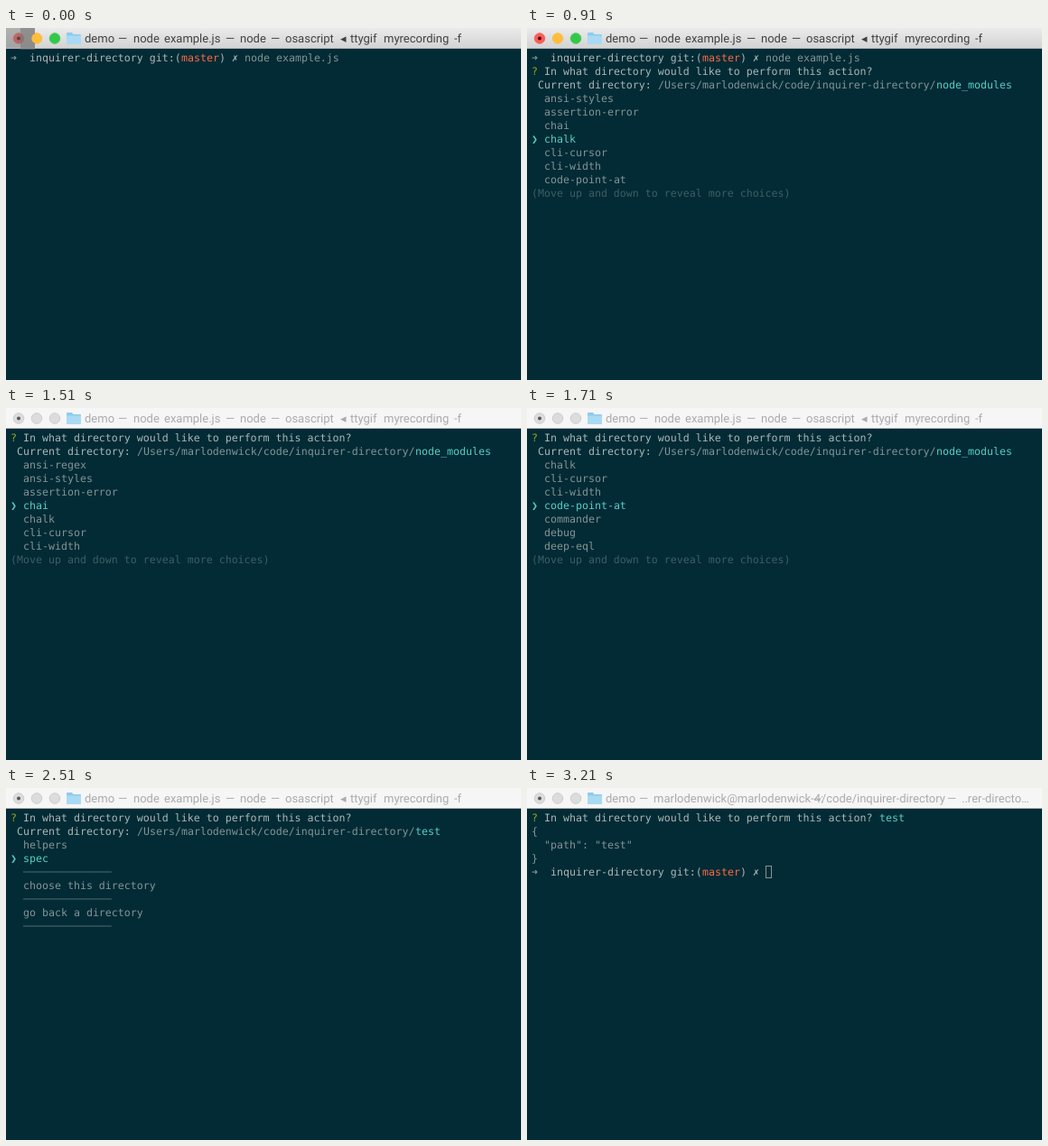
Animation, 570 px wide and 390 px high, one loop 3.36 s. Source, as an HTML page:

```html
<!DOCTYPE html>
<html lang="en">
<head>
<meta charset="utf-8">
<title>Directory prompt</title>
<style>
html, body { margin: 0; width: 100%; height: 100%; overflow: hidden; background: #022b35; }
svg { display: block; width: 570px; height: 390px; }
text { white-space: pre; text-rendering: geometricPrecision; }
#screen text { font: 11.627px "DejaVu Sans Mono", monospace; }
#title text { font: 13px Roboto, "DejaVu Sans", sans-serif; }
</style>
</head>
<body>
<svg viewBox="0 0 570 390">
  <defs>
    <linearGradient id="bar" x2="0" y2="1">
      <stop stop-color="#ebebeb"/><stop offset="1" stop-color="#d3d3d3"/>
    </linearGradient>
  </defs>
  <rect width="570" height="390" fill="#022b35"/>
  <rect id="titleBar" width="570" height="22"/>
  <rect y="22" width="570" height="1" fill="#b4b8b9"/>
  <g id="lights" stroke-width=".8"></g>
  <circle cx="14" cy="11.5" r="2" id="dot"/>
  <g id="shade">
    <path d="M0 0H32V22H0Z" fill="#777" opacity=".5"/>
    <path d="M16 0H32V24H16Z" fill="#777" opacity=".55"/>
    <circle cx="34" cy="11.5" r="5.8" fill="#fdbd3e"/>
  </g>
  <path d="M67 6q0-1 1-1h5l1.5 2H82q1 0 1 1v9q0 1-1 1H68q-1 0-1-1Z" fill="#8fcbed"/>
  <path d="M67 8.5H83V17q0 1-1 1H68q-1 0-1-1Z" fill="#a9daf4"/>
  <g id="title"></g>
  <g id="screen"></g>
</svg>
<script>
const LOOP = 3360, CELL = 7, ROW = 15, COLUMNS = 80, PAGE = 7;
const C = { text: '#839496', bright: '#aab7b7', cyan: '#56d0c5', green: '#9aa81f',
            red: '#fb6a45', dim: '#405d65', rule: '#516c73' };
const HOME = '/Users/marlodenwick/code/inquirer-directory/';
const RULE = '─'.repeat(14);
const menu = ['choose this directory', RULE, 'go back a directory', RULE];
const folders = {
  '': ['demo', 'node_modules', 'test', RULE, ...menu],
  'node_modules': ['ansi-escapes', 'ansi-regex', 'ansi-styles', 'assertion-error', 'chai',
    'chalk', 'cli-cursor', 'cli-width', 'code-point-at', 'commander', 'debug', 'deep-eql',
    'deep-is', 'escape-string-regexp', RULE, ...menu],
  'node_modules/chalk': menu,
  'test': ['helpers', 'spec', RULE, ...menu]
};

// Text runs are [row, column, string, colour].
const prompt = (row, command = '') => [
  [row, 0, '➜', C.text], [row, 3, 'inquirer-directory git:(', C.bright],
  [row, 27, 'master', C.red], [row, 33, ')', C.bright],
  [row, 35, '✗', C.bright], [row, 37, command, C.text]
];
const question = row => [
  [row, 0, '?', C.green],
  [row, 2, 'In what directory would like to perform this action?', C.bright]
];

function listing(row, path, active, pointer) {
  const items = folders[path], count = items.length;
  const start = 20, column = start + HOME.length, room = COLUMNS - column;
  const runs = [...question(row),
    [row + 1, 1, 'Current directory:', C.bright],
    [row + 1, start, HOME, C.text],
    [row + 1, column, path.slice(0, room), C.cyan]];
  let line = row + 2;
  if (path.length > room) runs.push([line++, 0, path.slice(room), C.cyan]);
  for (let i = 0; i < Math.min(PAGE, count); i++, line++) {
    const index = (active - pointer + i + count) % count, item = items[index];
    const chosen = index === active;
    if (chosen) runs.push([line, 0, '❯', C.cyan]);
    runs.push([line, 2, item, chosen ? C.cyan : item === RULE ? C.rule : C.text]);
  }
  if (count > PAGE) runs.push([line, 0, '(Move up and down to reveal more choices)', C.dim]);
  return runs;
}

const launch = prompt(0, 'node example.js');
const under = (...args) => [...launch, ...listing(1, ...args)];
const modules = (active, pointer = 3) => listing(0, 'node_modules', active, pointer);
const answered = [...question(0), [0, 55, 'test', C.cyan]];
const printed = [...answered, [1, 0, '{', C.text], [2, 2, '"path": "test"', C.text], [3, 0, '}', C.text]];

const scenes = [
  [0, launch],
  [310, under('', 0, 0)],
  [410, launch],
  [510, under('node_modules', 1, 1)],
  [610, under('node_modules', 3, 3)],
  [710, under('node_modules', 5, 3)],
  [810, under('node_modules', 7, 3)],
  [910, under('node_modules', 5, 3)],
  [1010, launch],
  [1110, under('node_modules/chalk', 0, 0)],
  [1210, listing(0, 'node_modules/chalk', 2, 2)],
  [1310, modules(0, 0)],
  [1410, modules(2, 2)],
  [1510, modules(4)],
  [1610, modules(6)],
  [1710, modules(8)],
  [1810, modules(6)],
  [1910, modules(4)],
  [2010, modules(2)],
  [2110, modules(0)],
  [2210, []],
  [2310, listing(0, '', 1, 1)],
  [2410, []],
  [2510, listing(0, 'test', 1, 1)],
  [2610, []],
  [2710, answered],
  [2810, printed, 0],
  [3110, printed, 0],
  [3210, [...printed, ...prompt(4)], 37]
];

const running = [[87, 'demo'], [124, '—'], [141, 'node'], [175, 'example.js'], [243, '—'],
  [259, 'node'], [293, '—'], [309, 'osascript'], [370, '◂'], [381, 'ttygif'],
  [418, 'myrecording'], [496, '-f']];
const finished = [[87, 'demo'], [124, '—'], [140, 'marlodenwick@marlodenwick-4:'],
  [317, '~/code/inquirer-directory'], [465, '—'], [481, '..rer-directo…']];

const $ = id => document.getElementById(id);
const label = (x, y, string, fill) => `<text x="${x}" y="${y}" fill="${fill}">${string}</text>`;

function drawWindow(time) {
  const focused = time < 1510;
  const words = time < 3110 ? running : finished;
  const colours = focused ? ['#fc5b57', '#fdbd3e', '#34c84a'] : Array(3).fill('#dcdcdc');
  $('titleBar').setAttribute('fill', focused ? 'url(#bar)' : '#f6f6f6');
  $('dot').setAttribute('fill', focused ? '#4d0000' : '#555');
  $('shade').style.display = time < 910 ? '' : 'none';
  $('lights').innerHTML = colours.map((fill, i) =>
    `<circle cx="${14 + 20 * i}" cy="11.5" r="5.8" fill="${fill}" stroke="${focused ? fill : '#c6c6c6'}"/>`).join('');
  $('title').innerHTML = words.map(([x, word]) =>
    label(x, 16, word, focused ? '#414141' : '#ababab')).join('');
}

function drawScreen(runs, cursor) {
  let markup = runs.map(([row, column, string, colour]) =>
    label(5 + CELL * column, 37 + ROW * row, string, colour)).join('');
  if (cursor !== undefined)
    markup += `<rect x="${5.5 + CELL * cursor}" y="86.5" width="6" height="13" fill="none" stroke="#839496"/>`;
  $('screen').innerHTML = markup;
}

let shown;
function draw(time) {
  const scene = scenes.findLast(([start]) => start <= time);
  if (scene !== shown) {
    shown = scene;
    drawWindow(scene[0]);
    drawScreen(scene[1], scene[2]);
  }
}

const began = performance.now();
function tick() {
  draw((performance.now() - began) % LOOP);
  requestAnimationFrame(tick);
}
tick();
</script>
</body>
</html>
```
